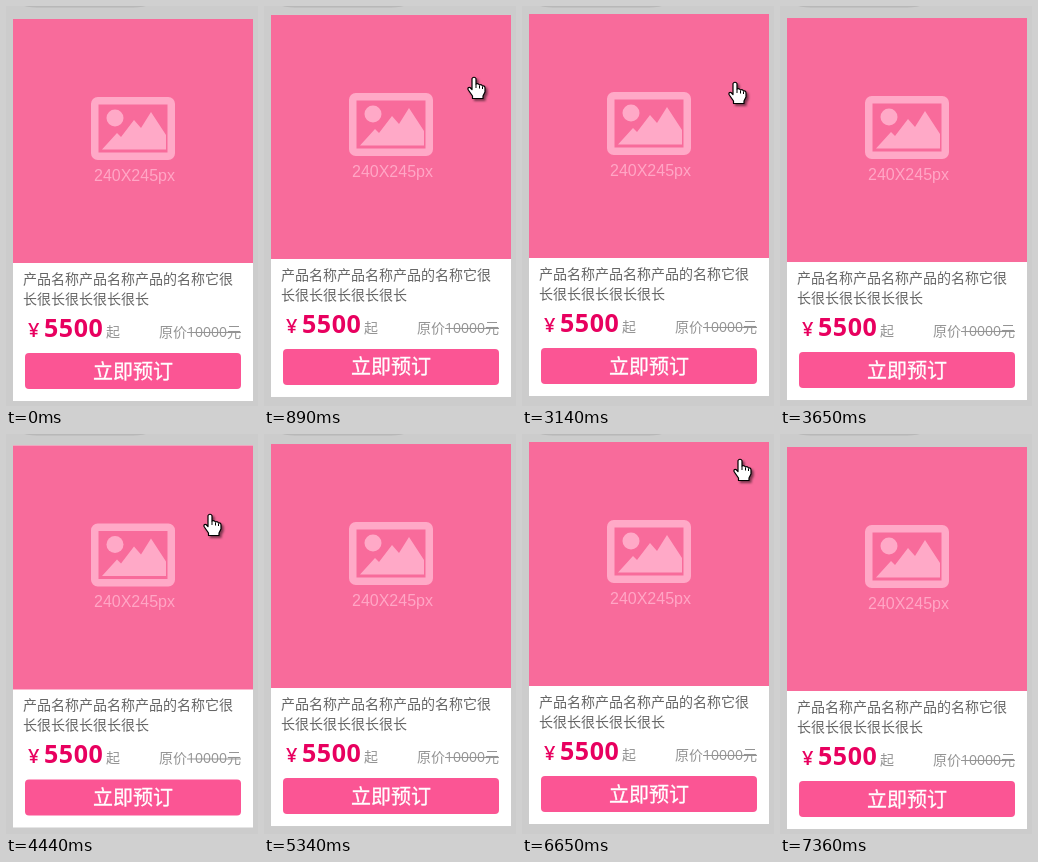
Animation, 252 px wide and 400 px high, one loop 8 s. Source, as an HTML page:

```html
<!DOCTYPE html>
<html lang="zh-CN">
<head>
<meta charset="utf-8">
<title>产品卡片</title>
<style>
html, body { margin: 0; width: 100%; height: 100%; overflow: hidden; background: #ccc; }
svg { display: block; width: 252px; height: 400px; }
text { font-family: "Open Sans", "Noto Sans CJK SC", "Noto Sans CJK", sans-serif; font-size: 14px; }
.name { fill: #666; }
.old { fill: #949494; }
.price { fill: #e8005f; font-weight: 700; }
.size { font: 16px "Liberation Sans", Arial, sans-serif; fill: #ffa6c5; }
#cursor { filter: drop-shadow(2px 2px 1px rgba(0, 0, 0, .5)); }
</style>
</head>
<body>
<svg viewBox="0 0 252 400">
  <rect width="252" height="400" fill="#ccc"/>
  <path d="M18 0Q24 1.6 36 1.6H122Q134 1.6 140 0Z" fill="#b8b8b8"/>

  <g id="card">
    <rect x="7" width="240" height="382" fill="#fff"/>
    <rect x="7" width="240" height="244" fill="#f86b9b"/>
    <rect x="88.75" y="81.75" width="76.5" height="55.5" rx="3" fill="none" stroke="#ffa9c7" stroke-width="7.5"/>
    <circle cx="109" cy="99" r="8.5" fill="#ffa9c7"/>
    <path d="M96 130.5L111 114L115 118L128 101L135 109L145 93L160 116V130.5Z" fill="#ffa9c7"/>
    <text class="size" x="88" y="162">240X245px</text>

    <text class="name" x="17" y="265">产品名称产品名称产品的名称它很</text>
    <text class="name" x="17" y="285">长很长很长很长很长</text>

    <text class="price" x="22" y="318" style="font-size:20px;font-weight:600">¥</text>
    <text class="price" x="38" y="318" style="font-size:25px;letter-spacing:.6px">5500</text>
    <text class="old" x="100" y="318">起</text>
    <text class="old" x="153" y="318">原价10000元</text>
    <rect x="181" y="313" width="54" height="1" fill="#949494"/>

    <rect x="19" y="334" width="216" height="36" rx="4" fill="#fb5594"/>
    <text x="127" y="359.5" text-anchor="middle" fill="#fff" stroke="#fff" stroke-width=".3" style="font-size:20px">立即预订</text>
  </g>

  <g id="cursor" stroke-linejoin="round">
    <g id="hand">
      <path d="M-3 .5Q-1 -2 1 .5V6Q3 5 4.5 7Q6.5 6 7.5 8Q10 7.5 10 10V14L8 18V20.5H-2.5V18L-7 11.5Q-7.5 9 -5 9.5L-3 11.5Z"
            fill="#fff" stroke="#000" stroke-width="1.2"/>
      <path d="M1 6V10M4.5 7.5V10.5M7.5 8.5V11" fill="none" stroke="#000"/>
    </g>
    <path id="arrow" d="M0 0V16L4 12.5L6.5 18L9 17L6.5 11.5H11.5Z" fill="#fff" stroke="#000"/>
  </g>
</svg>
<script>
const LOOP = 8000, SLIDE = 300, LOW = 13, RISE = 5, EDGE = 247;
// Each hover: cursor arrives, rests, then leaves to the right.
const visits = [
  { enter: 500, up: 950, leave: 1610, down: 2240, x: 211, y: 72 },
  { enter: 2430, up: 2880, leave: 3140, down: 3710, x: 214, y: 77 },
  { enter: 4200, up: 4650, leave: 4950, down: 5520, x: 200, y: 80 },
  { enter: 6110, up: 6650, leave: 6880, down: 7360, x: 219, y: 26 }
];
const [card, cursor, hand, arrow] =
  ["card", "cursor", "hand", "arrow"].map(id => document.getElementById(id));

const clamp = v => Math.max(0, Math.min(1, v));
const mix = (a, b, p) => a + (b - a) * p;
const easeInOut = p => p < .5 ? 4 * p ** 3 : 1 - 4 * (1 - p) ** 3;

function lift(v, t) {
  const rise = clamp((t - v.up + SLIDE) / SLIDE);
  const fall = clamp((t - v.down + SLIDE) / SLIDE);
  return rise - fall;
}

function pointer(v, t) {
  if (t < v.leave) {
    const p = easeInOut(clamp((t - v.enter) / (v.up - 120 - v.enter)));
    return [mix(258, v.x, p), mix(v.y + 10, v.y, p)];
  }
  const p = clamp((t - v.leave) / (v.down - 240 - v.leave));
  return [mix(v.x, 264, p * p), mix(v.y, v.y + 8, p * p)];
}

function draw(t) {
  const v = visits.find(s => t >= s.enter && t < s.down);
  const y = LOW - RISE * (v ? lift(v, t) : 0);
  card.setAttribute("transform", `translate(0 ${y})`);
  cursor.style.display = v ? "" : "none";
  if (!v) return;
  const [cx, cy] = pointer(v, t).map(Math.round);
  cursor.setAttribute("transform", `translate(${cx} ${cy})`);
  hand.style.display = cx < EDGE ? "" : "none";
  arrow.style.display = cx < EDGE ? "none" : "";
}

const start = performance.now();
function tick(now) {
  draw(Math.max(0, now - start) % LOOP);
  requestAnimationFrame(tick);
}
draw(0);
requestAnimationFrame(tick);
</script>
</body>
</html>
```
